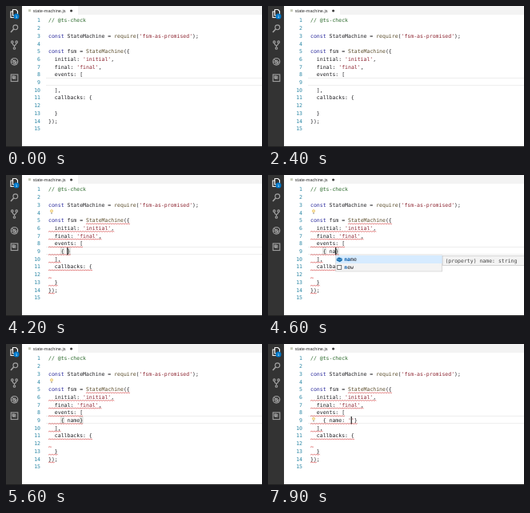
An HTML page that plays this animation: 320x177 px, repeating every 8000 ms.

```html
<!DOCTYPE html>
<html lang="en">
<head>
<meta charset="utf-8">
<title>Editor typing</title>
<style>
  html, body { margin: 0; width: 100%; height: 100%; overflow: hidden; background: #fff; }
  svg { display: block; width: 100vw; height: 100vh; }
  text { white-space: pre; text-rendering: geometricPrecision; }
  .code { font: 6.5px "DejaVu Sans Mono", monospace; fill: #202024; }
  .num { fill: #2b87a5; text-anchor: end; }
  .comment { fill: #2c6a2c; }
  .word { fill: #2a2a9c; }
  .str { fill: #8c2430; }
  .call { fill: #5a4c2a; }
  .tab, .badge { font: 5.6px "Liberation Sans", sans-serif; fill: #333; }
  .badge { font-size: 4.6px; fill: #fff; text-anchor: middle; }
  .icon { fill: none; stroke: #a3a3a3; stroke-width: 1.1; }
  .match { fill: #eef2ee; stroke: #c4c4c4; stroke-width: .5; }
  .wave { fill: none; stroke: #d64848; stroke-width: .7; }
  .hit { fill: #0a5ca8; font-weight: bold; }
  .side { fill: #444; }
</style>
</head>
<body>
<svg viewBox="0 0 320 177">
  <rect width="320" height="177" fill="#fff"/>
  <rect x="20" width="300" height="11" fill="#f3f3f3"/>
  <rect x="20" width="70" height="11" fill="#fff"/>
  <rect x="28" y="4.2" width="3" height="3" fill="#c6cbb8"/>
  <text class="tab" x="33.8" y="7.6">state-machine.js</text>
  <circle cx="81.6" cy="6" r="1.6" fill="#424242"/>

  <rect width="20" height="177" fill="#333"/>
  <g class="icon">
    <g stroke="#fff">
      <path d="M8.5 4.5h4l2 2v5.5h-6z"/>
      <path d="M8 7H6v7.5h5.5V12.5"/>
    </g>
    <circle cx="11.8" cy="26.8" r="2.9"/>
    <path d="M9.6 29L6 33" stroke-width="1.6"/>
    <circle cx="7.8" cy="45.2" r="1.3"/>
    <circle cx="13.2" cy="45.2" r="1.3"/>
    <circle cx="10.5" cy="53" r="1.3"/>
    <path d="M7.8 46.5q0 2 2.7 3.2q2.7-1.2 2.7-3.2M10.5 49.5v2.2"/>
    <circle cx="10.5" cy="69.8" r="4.3"/>
    <ellipse cx="10.5" cy="70.2" rx="1.5" ry="2.2"/>
    <path d="M7.5 66.8l6 6M6.5 70.2h2M12.5 70.2h2"/>
    <rect x="6.2" y="86" width="8.6" height="8.6"/>
    <path d="M8.2 88.2h2v2h-2zM8.2 91.2h4.4M11.8 88v2" stroke-width="1.3"/>
  </g>
  <circle cx="13" cy="13" r="3.5" fill="#007acc"/>
  <text class="badge" x="13" y="14.7">1</text>

  <path d="M50 90.5H320M50 99.5H320" stroke="#eee" stroke-width="1"/>
  <g id="marks"></g>
  <g id="lines"></g>
  <g id="waves"></g>
  <g id="bulb">
    <circle cx="57" cy="-1" r="1.6" fill="#fdeab0" stroke="#e0b250" stroke-width=".6"/>
    <rect x="56.2" y="1.2" width="1.6" height="1.4" fill="#999"/>
  </g>
  <rect id="caret" y="91" width="1.1" height="9.4" fill="#111"/>
  <g id="popup"></g>
  <rect y="176" width="320" height="1" fill="#222"/>
</svg>
<script>
const LOOP = 8000, LEFT = 53, CHAR = 3.914, TOP = 18.1, PITCH = 9.7, ROW = 9;
const code = [
  "// @ts-check",
  "",
  "const StateMachine = require('fsm-as-promised');",
  "",
  "const fsm = StateMachine({",
  "  initial: 'initial',",
  "  final: 'final',",
  "  events: [",
  "",
  "  ],",
  "  callbacks: {",
  "",
  "  }",
  "});",
  ""
];
// time of the key, text of the edited line, caret column
const keys = [
  [0, "", 4],
  [3500, "    {}", 5],
  [4000, "    { }", 6],
  [4500, "    { n}", 7],
  [4600, "    { na}", 8],
  [4700, "    { nam}", 9],
  [4900, "    { name}", 10],
  [6400, "    { name:}", 11],
  [7100, "    { name: }", 12],
  [7600, "    { name: ''}", 13]
];

const $ = id => document.getElementById(id);
const colX = c => LEFT + c * CHAR;
const lineY = n => TOP + (n - 1) * PITCH;
const label = (x, y, s, cls = "") => `<text class="code ${cls}" x="${x}" y="${y}">${s}</text>`;
const show = (el, on) => el.setAttribute("visibility", on ? "visible" : "hidden");

const paint = s => s.replace(/(\/\/.*)|('[^']*')|(\bconst\b)|(\w+(?=\())/g, (m, comment, str, word) =>
  `<tspan class="${comment ? "comment" : str ? "str" : word ? "word" : "call"}">${m}</tspan>`);

$("lines").innerHTML = code.map((s, i) => {
  const y = lineY(i + 1) + 2.3;
  return label(43, y, i + 1, "num") + label(LEFT, y, paint(s));
}).join("");
const typed = $("lines").children[2 * ROW - 1];

function wave(n, from, to) {
  const y = lineY(n) + 4.7, end = colX(to);
  let x = colX(from), d = `M${x} ${y}`;
  for (let k = 1; x < end; k++) {
    x = Math.min(x + 1.6, end);
    d += `L${x} ${y + (k % 2 ? -0.7 : 0)}`;
  }
  return `<path class="wave" d="${d}"/>`;
}

function drawWaves(text) {
  let out = "";
  for (let n = 5; n <= 14; n++) {
    const s = n === ROW ? text : code[n - 1];
    out += wave(n, n === 5 ? 12 : 0, n === 14 ? 2 : Math.max(s.length, 1));
  }
  return out;
}

function drawMarks(text, col) {
  if (text[col] !== "}") return "";
  return [4, col].map(c =>
    `<rect class="match" x="${colX(c)}" y="91.3" width="${CHAR}" height="8.6"/>`).join("");
}

function drawPopup(x, count, hit) {
  const word = (w, n) => `<tspan class="hit">${w.slice(0, n)}</tspan>${w.slice(n)}`;
  const side = x + 133.5;
  let out = `<rect x="${x}" y="101" width="133" height="${count * 10}" fill="#f3f3f3" stroke="#c8c8c8" stroke-width=".6"/>
    <rect x="${x}" y="101" width="133" height="10" fill="#d6ebff"/>
    <path d="M${x + 1} 105l3-1.8 4 1.6v2.6l-3 1.8-4-1.6z" fill="#1b6fae"/>
    <path d="M${x + 1} 105l4 1.7 3-1.9" fill="none" stroke="#b5d7f2" stroke-width=".5"/>`;
  out += label(x + 10.5, 108.3, word("name", hit));
  if (count > 1) {
    out += `<rect x="${x + 2}" y="113.4" width="5" height="5" fill="#fff" stroke="#555" stroke-width=".8"/>`;
    out += label(x + 10.5, 118, word("new", 1));
  }
  out += `<rect x="${side}" y="101.5" width="110" height="12" fill="#f3f3f3" stroke="#c8c8c8" stroke-width=".7"/>`;
  return out + label(side + 3.2, 110, "(property) name: string", "side");
}

function caretOn(t, since) {
  if (since) return Math.floor((t - since) / 500) % 2 === 0;
  if (t < 900) return t >= 100 && t < 500;
  return Math.floor((t - 900) / 500) % 2 === 0;
}

let last = "";
function render(t) {
  const [since, text, col] = keys.filter(k => k[0] <= t).pop();
  const errors = t >= 3800, popup = t >= 4600 && t < 5400;
  const bulbRow = t >= 7300 ? ROW : t >= 4200 && t < 7100 ? 4 : 0;

  show($("caret"), caretOn(t, since));
  show($("bulb"), bulbRow);
  if (bulbRow) $("bulb").setAttribute("transform", `translate(0 ${lineY(bulbRow) - 1})`);

  const key = [since, errors, popup].join();
  if (key === last) return;
  last = key;
  typed.innerHTML = paint(text);
  $("caret").setAttribute("x", colX(col) - 0.2);
  $("marks").innerHTML = drawMarks(text, col);
  $("waves").innerHTML = errors ? drawWaves(text) : "";
  $("popup").innerHTML = popup ? drawPopup(colX(col) + 0.4, since < 4700 ? 2 : 1, col - 6) : "";
}

const start = performance.now();
function tick(now) {
  render(Math.max(0, now - start) % LOOP);
  requestAnimationFrame(tick);
}
render(0);
requestAnimationFrame(tick);
</script>
</body>
</html>
```
